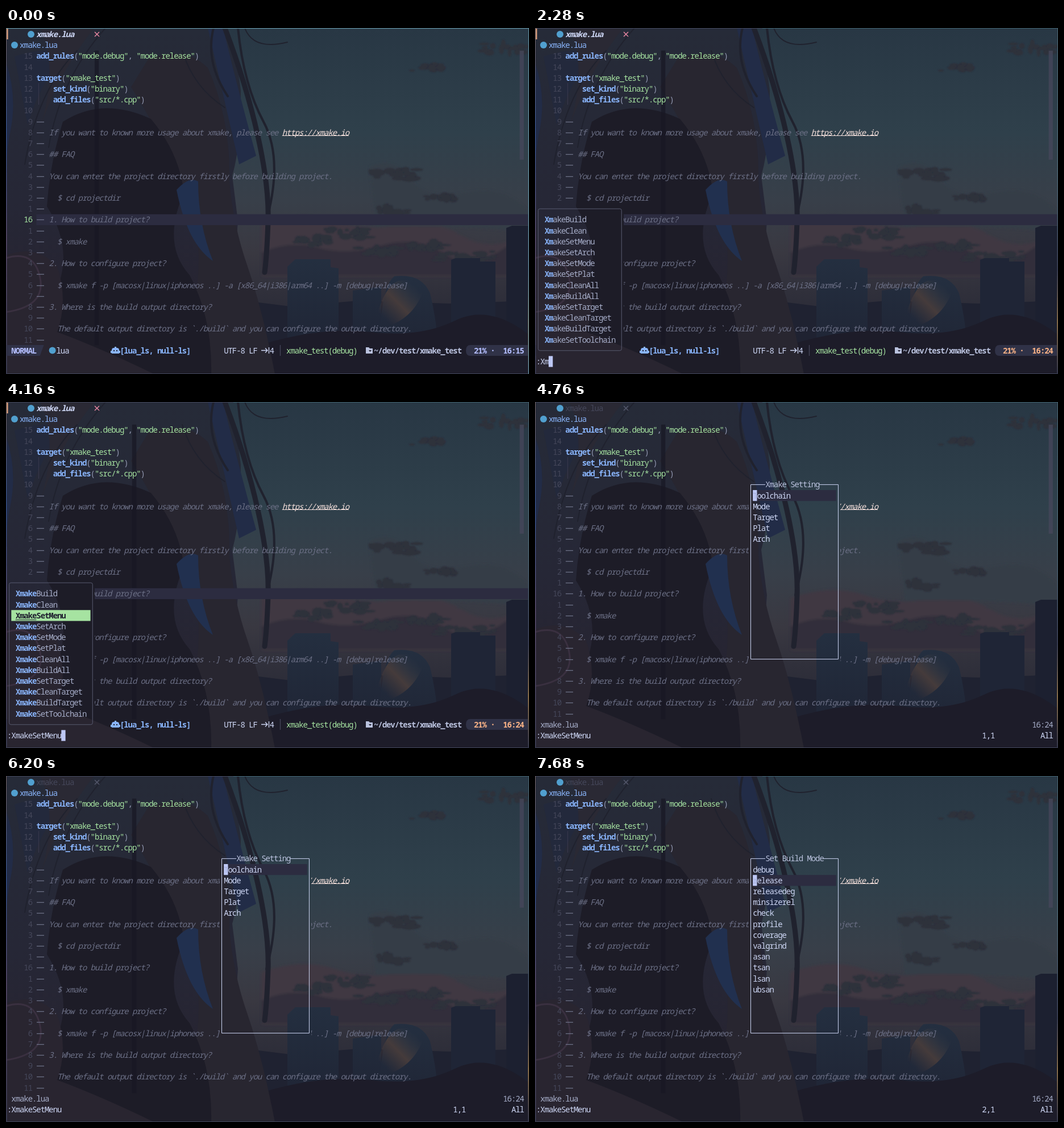
An HTML page with a canvas for the animation above (8 s loop, 920x609 px).

```html
<!DOCTYPE html>
<html lang="en">
<head>
<meta charset="utf-8">
<title>Editor with build menu</title>
<style>
html, body { margin: 0; width: 100%; height: 100%; overflow: hidden; background: #20202d; }
svg, canvas { position: absolute; left: 0; top: 0; width: 920px; height: 609px; }
</style>
</head>
<body>
<svg viewBox="0 0 920 609">
  <defs>
    <linearGradient id="sky" x1="0" y1="0" x2="0" y2="1">
      <stop offset="0" stop-color="#283744"/>
      <stop offset=".3" stop-color="#2f404b"/>
      <stop offset=".5" stop-color="#383f49"/>
      <stop offset=".65" stop-color="#393841"/>
      <stop offset=".76" stop-color="#30303b"/>
      <stop offset="1" stop-color="#1f2130"/>
    </linearGradient>
    <linearGradient id="hair" x1="0" y1="0" x2="0" y2="1">
      <stop offset="0" stop-color="#262b38"/>
      <stop offset=".5" stop-color="#262736"/>
      <stop offset="1" stop-color="#27222e"/>
    </linearGradient>
    <linearGradient id="tower" x1="0" y1="0" x2="0" y2="1">
      <stop offset="0" stop-color="#242f40"/>
      <stop offset="1" stop-color="#1e2232"/>
    </linearGradient>
    <linearGradient id="glow" x1="0" y1="1" x2="1" y2="0">
      <stop offset=".2" stop-color="#403638" stop-opacity="0"/>
      <stop offset=".5" stop-color="#453b3b"/>
      <stop offset=".85" stop-color="#343b46" stop-opacity="0"/>
    </linearGradient>
    <linearGradient id="left" x1="0" y1="0" x2="0" y2="1">
      <stop offset="0" stop-color="#72605f"/>
      <stop offset=".3" stop-color="#34508a"/>
      <stop offset=".6" stop-color="#554867"/>
      <stop offset="1" stop-color="#37384c"/>
    </linearGradient>
    <linearGradient id="right" x1="0" y1="0" x2="0" y2="1">
      <stop offset=".4" stop-color="#4a6470"/>
      <stop offset=".7" stop-color="#3a3f55"/>
      <stop offset=".85" stop-color="#8a6f4a"/>
      <stop offset="1" stop-color="#33364a"/>
    </linearGradient>
    <filter id="soft"><feGaussianBlur stdDeviation="2"/></filter>
    <filter id="haze"><feGaussianBlur stdDeviation="1"/></filter>
  </defs>
  <rect width="920" height="609" fill="url(#sky)"/>
  <g filter="url(#soft)">
    <path fill="#3f3942" d="M450 345q70-25 130-5t110 5 110 20 120-8v80H450z"/>
    <path fill="#353c47" d="M640 245q40-20 70 20t100 25 110 35v35q-130-15-270-10z"/>
    <path fill="#302f3b" d="M450 395q50-22 100-8t110-4 110 14 110-12l40 5v45H450z"/>
  </g>
  <g id="clouds" fill="#2d303b" filter="url(#haze)"/>
  <!-- skyline -->
  <path fill="#1f2231" d="M420 480l80 10 120-10 160 5 140-5v129H420z"/>
  <path fill="url(#tower)" d="M495 609V420l14-13h62v14l14 2v186zM610 609V462l50-7v154z"/>
  <path fill="url(#tower)" d="M655 609q0-150 28-172 48-6 63 30 15 60 17 142z"/>
  <path fill="url(#glow)" d="M650 515q15-60 40-70 35-5 45 15-20 60-85 70z"/>
  <path fill="#1f2536" d="M783 609V408l8-3h43v6h27v198z"/>
  <path fill="#1c2030" d="M880 609V352l10-4h30v261z"/>
  <path fill="#1d1c29" d="M440 560q110-35 200-25t150-20 130 25v69H440z"/>
  <!-- silhouette -->
  <path fill="url(#hair)" d="M0 0h385q20 40 28 110 0 100-15 150l10 80-20 269H0z"/>
  <path fill="#222c47" d="M0 60q20 60 8 120T0 310zM355 0h27q20 85 58 225l-30 15q-25-110-55-240z"/>
  <path fill="#23293c" d="M15 50q45-15 95-10Q60 95 38 170z"/>
  <path fill="#2a2934" d="M60 0h95Q95 75 62 170q30-105-2-170z"/>
  <path fill="#282630" d="M250 55q65-25 105 15 40 90 38 200 6 75 32 150t48 189H330q-5-60 0-110 20-110-5-180-50-130-105-215z"/>
  <path fill="#1d1c27" d="M100 165q70-45 155-5 50 60 58 130-40 90 10 145 40 75 38 174H110q-40-75-18-155 25-70-20-140 5-75 28-149z"/>
  <path fill="#21304f" d="M300 285q22-25 38-15 0 75 26 140-45-30-64-125z"/>
  <path fill="#292530" d="M0 400q55-20 90 20 20 60 0 115 80 30 170 74H0z"/>
  <g fill="none" stroke="#20222e" stroke-linecap="round">
    <path stroke-width="9" d="M385 0q38 100 58 190t18 150-6 90"/>
    <path stroke-width="4" d="M408 0q10 100 45 165t5 175M365 0q-15 60 25 120"/>
    <path stroke-width="2" d="M420 0q15 40 75 25M125 40q-70 70-92 200M175 0Q95 90 75 210M310 40q20 65 75 100"/>
    <path stroke="#3a3040" stroke-width="3" d="M0 405q50-15 60 35t-60 60"/>
  </g>
  <rect x=".5" y=".5" width="919" height="608" fill="none" stroke="#41465a"/>
  <path stroke="#40606e" d="M400 .5H920"/>
  <path stroke="url(#left)" stroke-width="2" d="M0 0L1 609"/>
  <path stroke="url(#right)" stroke-width="2" d="M920 0L919 609"/>
</svg>
<canvas id="screen" width="920" height="609"></canvas>
<script>
const LOOP = 8000, CELL = 7.33, ROW = 19.2;
const FACE = '14px "Noto Sans Mono", "DejaVu Sans Mono", monospace';
const C = {
  text: '#cdd6f4', sub: '#a6adc8', dim: '#6c7086', line: '#45475a', blue: '#89b4fa', green: '#a6e3a1',
  peach: '#fab387', pink: '#f38ba8', rose: '#f5e0dc', lavender: '#b4befe', ink: '#1e1e2e',
  icon: '#51a0cf', bar: '#2c2c40', pill: '#303247', cursor: '#bec8f5', punct: '#9399b2'
};
const comments = [
  '', 'If you want to known more usage about xmake, please see ', '', '## FAQ', '',
  'You can enter the project directory firstly before building project.', '', '  $ cd projectdir', '',
  '1. How to build project?', '', '  $ xmake', '', '2. How to configure project?', '',
  '  $ xmake f -p [macosx|linux|iphoneos ..] -a [x86_64|i386|arm64 ..] -m [debug|release]', '',
  '3. Where is the build output directory?', '',
  '  The default output directory is `./build` and you can configure the output directory.', ''
];
const symbols = ['!', '#', '&', '*', '<', '=', '>', '@', '~', 'Next', 'append', 'buffer', 'checkhealth'];
const commands = ['Build', 'Clean', 'SetMenu', 'SetArch', 'SetMode', 'SetPlat', 'CleanAll', 'BuildAll',
  'SetTarget', 'CleanTarget', 'BuildTarget', 'SetToolchain'].map(s => 'Xmake' + s);
const settings = ['Toolchain', 'Mode', 'Target', 'Plat', 'Arch'];
const modes = ['debug', 'release', 'releasedeg', 'minsizerel', 'check', 'profile', 'coverage', 'valgrind',
  'asan', 'tsan', 'lsan', 'ubsan'];

// [start, value] steps
const typed = [[0, ''], [1320, ':'], [2000, ':X'], [2280, ':Xm'], [2340, ':Xma'], [2400, ':Xmak'], [2560, ':Xmake']];
const matched = [[0, 1], [2280, 2], [2340, 3], [2400, 4], [2600, 5]];
const chosen = [[0, -1], [3160, 0], [3760, 1], [4160, 2]];
const picked = [[0, 1], [5280, 2], [5360, 3], [5560, 4], [5960, 3], [6080, 2], [6200, 1],
  [6480, 2], [6560, 3], [6960, 2], [7080, 3], [7400, 2]];
const at = (steps, t) => steps.findLast(s => s[0] <= t)[1];

const g = document.getElementById('screen').getContext('2d');
g.font = FACE;
g.letterSpacing = CELL - g.measureText('0').width + 'px';

const X = col => 2 + col * CELL;
const Y = row => 11 + row * ROW;

function put(row, col, text, color, style = '') {
  g.font = style + ' ' + FACE;
  g.fillStyle = color;
  g.fillText(text, X(col), Y(row) + 5);
  return col + text.length;
}
function line(row, col, ...parts) {
  for (const part of parts) col = put(row, col, ...part);
}
function fill(row, col, w, color, h = 1) {
  g.fillStyle = color;
  g.fillRect(X(col), Y(row - .5), w * CELL, h * ROW);
}
function clear(row, col, w, h) {
  g.clearRect(X(col), Y(row - .5), w * CELL, h * ROW);
}
function frame(row, col, w, h, color, radius) {
  clear(row, col, w, h);
  g.strokeStyle = color;
  g.lineWidth = 1;
  g.beginPath();
  g.roundRect(X(col + .5), Y(row), (w - 1) * CELL, (h - 1) * ROW, radius);
  g.stroke();
}
function shape(path, color, stroke) {
  const p = new Path2D(path);
  g.fillStyle = g.strokeStyle = color;
  g.lineWidth = 1.3;
  stroke ? g.stroke(p) : g.fill(p);
}
function dot(x, y) {
  g.fillStyle = C.icon;
  g.beginPath();
  g.arc(x, y, 6, 0, 7);
  g.fill();
}

function drawCode(t, active) {
  const col = t < 600 ? 21 : 30;
  fill(2, col, 1, '#181825b8', 27);
  if (active) {
    clear(17, col, 1, 1);
    fill(17, 7, 118, C.bar);
    g.fillStyle = C.peach;
    g.fillRect(1.5, 1, 2, 19);
  }
  dot(44, 11);
  put(0, 7, 'xmake.lua', active ? C.text : C.line, active ? 'italic bold' : '');
  shape('M156 7l8 8m0-8l-8 8', active ? C.pink : '#585b70', true);
  dot(15, 30);
  put(1, 3, 'xmake.lua', C.blue);

  for (let row = 2; row < 29; row++) {
    const here = row === 17;
    const n = String(here ? 16 : Math.abs(row - 17));
    put(row, 6 - n.length, n, here && active ? C.green : C.line);
  }
  const fn = s => [s, C.blue, 'bold'], str = s => [`"${s}"`, C.green], p = s => [s, C.punct];
  line(2, 7, fn('add_rules'), p('('), str('mode.debug'), p(', '), str('mode.release'), p(')'));
  line(4, 7, fn('target'), p('('), str('xmake_test'), p(')'));
  line(5, 11, fn('set_kind'), p('('), str('binary'), p(')'));
  line(6, 11, fn('add_files'), p('('), str('src/*.cpp'), p(')'));
  shape('M57.5 97v38', '#36374a', true);

  comments.forEach((s, i) => {
    const row = i + 8, y = Math.round(Y(row)) + .5;
    shape(`M54 ${y}h13`, C.dim, true);
    put(row, 10, s, C.dim, 'italic');
  });
  put(9, 66, 'https://xmake.io', C.rose, 'italic');
  g.fillRect(X(66), 189, 16 * CELL, 1);
  if (active && t >= 320 && t < 1320) fill(17, col, 1, C.cursor);
  fill(2, 123, 1, '#45475acc', 10);
}

function drawStatus(t) {
  const command = t >= 1320, tint = command ? C.peach : C.lavender;
  const mode = command ? 'COMMAND' : 'NORMAL', end = X(mode.length + 2);
  shape(`M1 558H${end + 6}l-7 19H1z`, C.pill);
  put(29, 1, mode, tint, 'bold');
  dot(end + 21, 567.5);
  put(29, mode.length + 6 - .2, 'lua', C.text);
  shape('M186 567q0-4 4-4h1v-2h3v2h1q4 0 4 4v6h-13zM184 568h2v4h-2zM199 568h2v4h-2z', C.blue);
  g.fillStyle = C.ink;
  g.fillRect(189, 567, 2, 2);
  g.fillRect(194, 567, 2, 2);
  put(29, 27, '[lua_ls, null-ls]', C.blue, 'bold');
  put(29, 52, 'UTF-8 LF', C.text);
  shape('M449 567.5h11m-4-4l4 4-4 4M462.5 562v11', C.text, true);
  put(29, 63, '4', C.text);
  shape('M482.5 558v19', C.line, true);
  put(29, 67, 'xmake_test(debug)', C.green);
  shape('M633 562h5l2 2h5v9h-12z', '#bac2de');
  shape('M638 567h5l-2.5 3z', C.ink);
  put(29, 88, '~/dev/test/xmake_test', '#bac2de', 'bold');
  shape('M918 558H817q-8 0-8 9.5t8 9.5h101z', C.pill);
  put(29, 112, '21% ·', tint, 'bold');
  put(29, 119, t < 600 ? '16:15' : '16:24', tint, 'bold');
}

function drawCompletion(t) {
  const early = t < 2000, items = early ? symbols : commands;
  const top = 28 - items.length, inner = early ? 14 : 19;
  const n = early ? 0 : at(matched, t), sel = at(chosen, t);
  frame(top, 0, inner + 2, items.length + 2, '#585b70', 3);
  items.forEach((s, i) => {
    const row = top + 1 + i;
    if (i === sel) {
      fill(row, 1, inner, C.green);
      put(row, 2, s, C.ink, 'bold');
      g.fillRect(X(2), Y(row) + 7, n * CELL, 1);
    } else {
      line(row, 2, [s.slice(0, n), C.blue, 'bold'], [s.slice(n), C.sub]);
    }
  });
}

function drawMenu(t) {
  const build = t >= 7640, items = build ? modes : settings;
  const title = build ? 'Set Build Mode' : 'Xmake Setting', sel = at(picked, t);
  frame(7, 51, 22, 17, C.text, 0);
  clear(7, 55, title.length, 1);
  put(7, 55, title, '#bac2de');
  fill(7 + sel, 52, 20, C.bar);
  items.forEach((s, i) => put(8 + i, 52, s, C.text));
  fill(7 + sel, 52, 1, C.cursor);
  put(7 + sel, 52, items[sel - 1][0], '#a9b2dd');
  put(29, 1, 'xmake.lua', C.sub);
  put(29, 119, '16:24', C.sub);
  put(30, 107, sel + ',1', C.text);
  put(30, 121, 'All', C.text);
}

// window edge fades out in four steps
function drawEdge(t) {
  g.globalAlpha = 1 - Math.min(4, Math.floor(t / 80)) / 4;
  shape('M0 .5H919.5V609', '#5f8c9c', true);
  g.globalAlpha = 1;
}

function draw(now) {
  const t = now % LOOP, active = t < 4760;
  g.clearRect(0, 0, 920, 609);
  drawCode(t, active);
  if (active) drawStatus(t);
  else drawMenu(t);
  if (active && t >= 1480) drawCompletion(t);
  const sel = at(chosen, t);
  const text = sel < 0 ? at(typed, t) : ':' + commands[sel];
  put(30, 0, text, C.text);
  if (active && text) fill(30, text.length, 1, C.cursor);
  drawEdge(t);
  requestAnimationFrame(draw);
}

// cloud clusters: x, y, half width
let seed = 7;
const rnd = () => (seed = seed * 16807 % 2147483647) / 2147483647;
let puffs = '';
for (const [x, y, w] of [[742, 70, 28], [875, 36, 40], [680, 258, 46], [676, 322, 30], [765, 300, 26],
  [600, 362, 42], [655, 392, 38], [740, 385, 34], [810, 402, 50], [540, 375, 34]]) {
  for (let i = 0; i < 18; i++) {
    const d = rnd() * 2 - 1;
    puffs += `<ellipse cx="${x + d * w}" cy="${y + (rnd() - .5) * w * .4}" rx="${3 + rnd() * w * .25}" ry="${2 + (1 - d * d) * 7 * rnd()}"/>`;
  }
}
document.getElementById('clouds').innerHTML = puffs;
requestAnimationFrame(draw);
</script>
</body>
</html>
```
